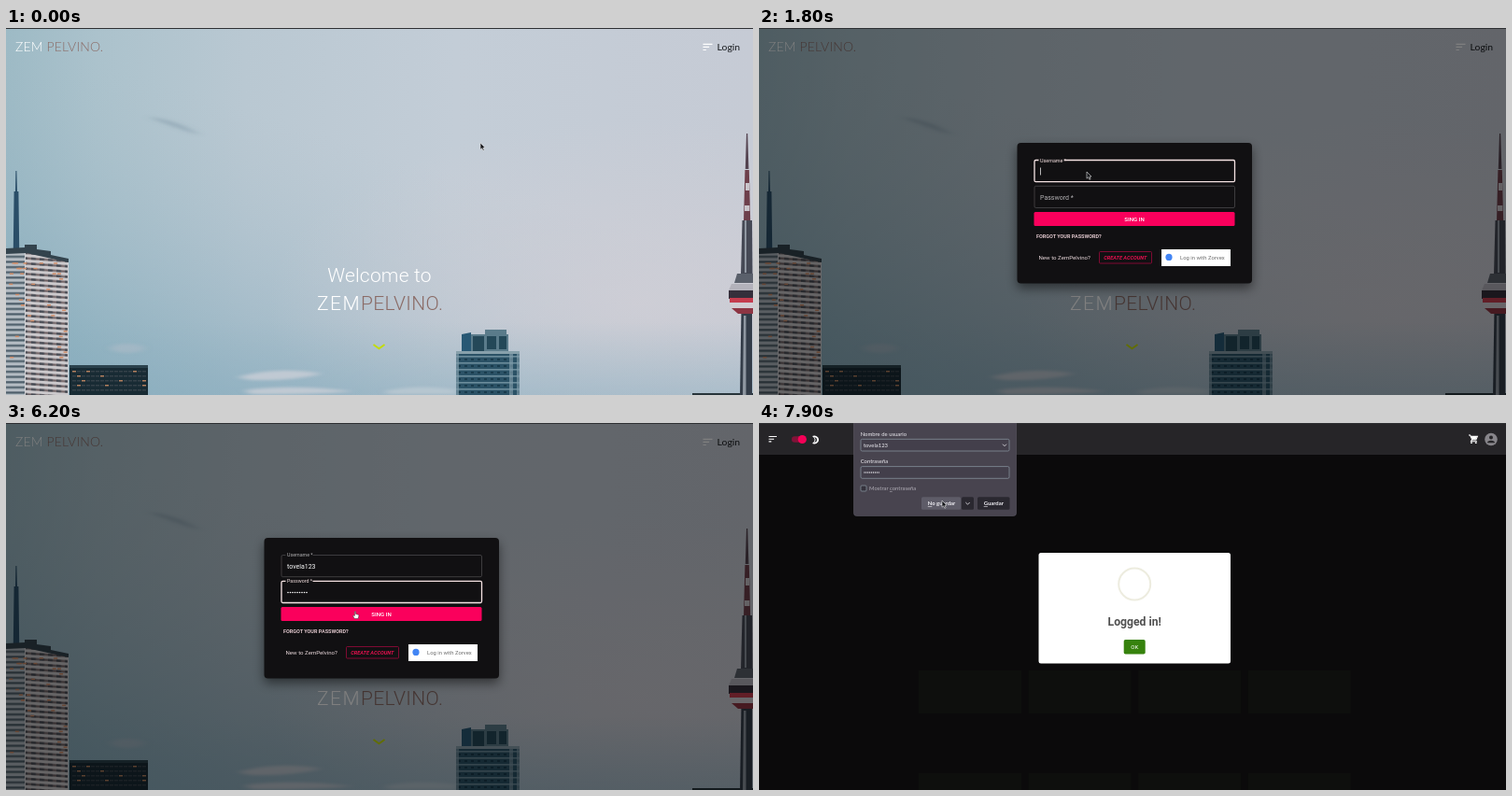
Animation of 800x393 px, one loop 8000 ms. Source, as an HTML page:

```html
<!DOCTYPE html>
<html lang="en">
<head>
<meta charset="utf-8">
<title>Login demo</title>
<style>
html, body { margin: 0; width: 100%; height: 100%; overflow: hidden; background: #0b0a0b; }
svg { display: block; width: 800px; height: 393px; }
text { font-family: Roboto, sans-serif; white-space: pre; }
.brand { font-family: Lato, sans-serif; font-weight: 300; fill: #fff; }
.dim { fill: #8b6c67; }
.ui, .ui text { font-family: Lato, "Open Sans", sans-serif; }
.key { text-decoration: underline; }
</style>
</head>
<body>
<svg viewBox="0 0 800 393" xmlns="http://www.w3.org/2000/svg">
  <defs>
    <linearGradient id="sky">
      <stop offset="0" stop-color="#9dbac5"/><stop offset=".12" stop-color="#abc2cc"/>
      <stop offset=".32" stop-color="#b9c8d2"/><stop offset=".6" stop-color="#c3cdd7"/>
      <stop offset="1" stop-color="#c6cbd5"/>
    </linearGradient>
    <linearGradient id="haze" x1="0" y1="1" x2=".45" y2=".3">
      <stop offset="0" stop-color="#6a9cb0" stop-opacity=".65"/><stop offset=".5" stop-color="#86aabc" stop-opacity=".3"/>
      <stop offset="1" stop-color="#a9bdc8" stop-opacity="0"/>
    </linearGradient>
    <radialGradient id="dusk" cx=".85" cy=".75" r=".5">
      <stop offset="0" stop-color="#d2cfd6" stop-opacity=".75"/><stop offset="1" stop-color="#d2cfd6" stop-opacity="0"/>
    </radialGradient>
    <linearGradient id="low" x2="0" y2="1">
      <stop offset=".8" stop-color="#8fb0c1" stop-opacity="0"/><stop offset="1" stop-color="#8fb0c1" stop-opacity=".45"/>
    </linearGradient>
    <pattern id="floors" width="9" height="5.6" patternUnits="userSpaceOnUse" patternTransform="skewY(4)">
      <rect width="9" height="5.6" fill="#cbc9cc"/><rect y="3.2" width="9" height="2.1" fill="#6d5f61"/><rect y="3.2" width="5" height="2.1" fill="#424851"/>
    </pattern>
    <pattern id="side" width="4" height="5.6" patternUnits="userSpaceOnUse">
      <rect width="4" height="5.6" fill="#b4bcc3"/><rect y="3" width="4" height="2.2" fill="#4c5d69"/>
    </pattern>
    <pattern id="glass" width="7" height="7" patternUnits="userSpaceOnUse">
      <rect width="7" height="7" fill="#2b5266"/><rect y="1" width="7" height="1.6" fill="#6b8c9b"/><rect x="1" y="4" width="3" height="2" fill="#193b4c"/>
    </pattern>
    <filter id="soft" x="-50%" y="-100%" width="200%" height="300%"><feGaussianBlur stdDeviation="4 1.6"/></filter>
    <filter id="shade" x="-20%" y="-20%" width="140%" height="150%" color-interpolation-filters="sRGB"><feDropShadow dx="0" dy="5" stdDeviation="6" flood-opacity=".5"/></filter>
    <g id="sort" stroke-width="1.2"><path d="M0 0H10M0 3.1H6.6M0 6.2H3.3"/></g>
  </defs>

  <g id="home">
    <rect width="800" height="393" fill="url(#sky)"/>
    <rect width="800" height="393" fill="url(#haze)"/>
    <rect width="800" height="393" fill="url(#dusk)"/>
    <rect width="800" height="393" fill="url(#low)"/>
    <g filter="url(#soft)">
      <path d="M152 95Q185 99 208 115Q182 107 152 95" fill="#8ba2b0" opacity=".7"/>
      <path d="M248 374Q290 362 338 370Q310 378 262 377z" fill="#c0c9d3"/>
      <path d="M255 388Q305 381 372 389Q320 393 262 392z" fill="#c0c9d3"/>
      <path d="M405 389Q440 381 482 387V392H410z" fill="#b6c6d0"/>
      <ellipse cx="130" cy="343" rx="18" ry="5" fill="#a9bac6" opacity=".7"/>
    </g>
    <path d="M10.4 153h1l.6 22h1.4l.8 62H7.8l.8-62H10z" fill="#2a4e68"/>
    <path d="M0 240L24 238L67 249V393H0z" fill="url(#floors)"/>
    <path d="M0 240L21 239V393H0z" fill="url(#side)"/>
    <path d="M20.5 239V393M66.5 250V393" stroke="#d0d0d4"/>
    <path d="M0 236L20 235V232H33V237L48 239V243L67 247V251L22 241L0 242z" fill="#33434d"/>
    <path d="M68 361H152V393H68z" fill="#182b34"/>
    <path d="M68 361H152V364H68z" fill="#2b424d"/>
    <g id="lights"></g>
    <path d="M488 328L498 326V348H488z" fill="#285874"/>
    <path d="M498 328H513V323H536V328H538V348H498z" fill="#5a7b8a"/>
    <path d="M500 330H512V346H500zM515 330H525V344H515zM528 330H536V344H528z" fill="#244858"/>
    <path d="M482 347H550V393H482z" fill="url(#glass)"/>
    <path d="M482 347H485V393H482zM539 349H543V393H539zM547 349H550V393H547z" fill="#7f9caa" opacity=".7"/>
    <path d="M482 346H550V349H482z" fill="#87a0ab"/>
    <path d="M735 391H800V393H735z" fill="#27343a"/>
    <path d="M793 113h1.2l1.2 38h-3.6z" fill="#53424f"/>
    <path d="M791.4 152h4.4l1.4 55h-7.2z" fill="#6d3f4b"/>
    <path d="M792 166h4v8h-4zM791 190h5.4v6h-5.4z" fill="#c9c4ca"/>
    <path d="M788.5 206H799L799.5 264H787z" fill="#454955"/>
    <path d="M787.5 300H799V393H786z" fill="#333c48"/>
    <path d="M791 206h2v56h-2zM790 308h2.5v85H789z" fill="#8f97a1"/>
    <path d="M783 263H800V273H780z" fill="#5a606b"/>
    <path d="M777 274H800V281H774z" fill="#b3b2bb"/>
    <path d="M774 281H800V290H774z" fill="#352f3b"/>
    <path d="M775 289H800V294H775z" fill="#c53c4e"/>
    <path d="M775 295H800V300H777z" fill="#d3cdd3"/>
    <path d="M777 300H800V306H784z" fill="#8d3543"/>
    <text class="brand" x="10" y="25" font-size="14" letter-spacing=".15">ZEM <tspan class="dim">PELVINO.</tspan></text>
    <use href="#sort" x="746.5" y="17.3" stroke="#fff"/>
    <text class="ui" x="761.5" y="24" font-size="10.4" fill="#25282c" font-weight="500">Login</text>
    <g class="brand" font-size="21">
      <text x="400" y="272" text-anchor="middle" letter-spacing=".2">Welcome to</text>
      <text x="380" y="302" text-anchor="end" letter-spacing="1.4">ZEM</text>
      <text class="dim" x="380" y="302" letter-spacing=".3">PELVINO.</text>
    </g>
    <path d="M393.5 339L399.5 343.3L405.5 339" fill="none" stroke="#c3dc08" stroke-width="2"/>
  </g>

  <g id="modal">
    <rect width="800" height="393" opacity=".5"/>
    <rect id="card" x="276.5" width="251.5" rx="4" fill="#111012" filter="url(#shade)"/>
    <g id="fields"></g>
    <text id="helper" x="301" y="195.3" font-size="5.3" font-style="italic" fill="#e0392d">At least 8 characters, it must contain 1 letter and 1 number</text>
    <g id="actions">
      <rect id="submit" x="294.5" y="0" width="215" height="15" rx="1.5"/>
      <text id="submitText" x="402" y="9.8" font-size="6.1" font-weight="500" text-anchor="middle">SING IN</text>
      <text x="297" y="27.6" font-size="5.5" font-weight="700" fill="#e2c8ce">FORGOT YOUR PASSWORD?</text>
      <text x="299.5" y="51" font-size="6.1" fill="#ead9dc">New to ZemPelvino?</text>
      <rect x="364.5" y="42.5" width="56" height="12.5" rx="1" fill="none" stroke="#9c0a3b" stroke-width=".8"/>
      <text x="392.3" y="51" font-size="5.6" font-weight="700" font-style="italic" text-anchor="middle" fill="#e5104f">CREATE ACCOUNT</text>
      <rect x="431" y="40" width="74" height="18" fill="#fff"/>
      <circle cx="439" cy="48.4" r="3.6" fill="#4285f4"/>
      <text x="451" y="51" font-size="5.9" fill="#6b6b6b">Log in with Zorvex</text>
    </g>
  </g>

  <g id="shop">
    <rect width="800" height="393" fill="#0b0a0b"/>
    <rect width="800" height="34" fill="#262528"/>
    <g id="cards" fill="#0e0f0d"></g>
    <use href="#sort" transform="translate(10.5 14.6) scale(.85)" stroke="#fff"/>
    <rect x="35" y="14.3" width="14" height="6.5" rx="3.2" fill="#811338"/>
    <circle cx="46.3" cy="17.5" r="4.6" fill="#f50057"/>
    <path d="M57 14A5 4.4 0 1 1 57 22Q62.3 18 57 14z" fill="#fff"/>
    <path d="M59 15.2Q62.2 18 59 20.8Q62 20.8 62 18T59 15.2" fill="#262528"/>
    <path d="M760 13h1.6l2.2 5h4l1.6-3.7h-7M763.5 18l-1 1.8h6.5" fill="none" stroke="#fff" stroke-width="1.1"/>
    <path d="M762.4 14H769L767.4 17.8H764z" fill="#fff"/>
    <circle cx="763" cy="21.2" r=".9" fill="#fff"/><circle cx="767.8" cy="21.2" r=".9" fill="#fff"/>
    <circle cx="784" cy="17.5" r="6.8" fill="#87858a"/>
    <circle cx="784" cy="15.6" r="2" fill="#262528"/><path d="M780 21.3Q780 18.8 784 18.8T788 21.3z" fill="#262528"/>
    <g id="alert">
      <rect x="299.5" y="139" width="205.5" height="118.5" rx="2.5" fill="#fff"/>
      <circle cx="402.2" cy="172.5" r="17" fill="none" stroke="#edecdf" stroke-width="2"/>
      <text x="402.2" y="216.7" font-size="12.2" font-weight="700" text-anchor="middle" fill="#505050">Logged in!</text>
      <rect x="390.7" y="232" width="23" height="15.5" rx="1.8" fill="#36820d"/>
      <text x="402.2" y="242" font-size="6.2" text-anchor="middle" fill="#fff">OK</text>
    </g>
  </g>

  <path d="M0 .5H800" stroke="#2e3033"/>

  <g id="popup" class="ui" font-size="5.9" fill="#eeedf2">
    <path d="M101.5 0H275.5V96.5Q275.5 99.5 272.5 99.5H104.5Q101.5 99.5 101.5 96.5z" fill="#48444f" stroke="#5b5863" stroke-width=".6"/>
    <text x="108.7" y="13.6">Nombre de usuario</text>
    <text x="108.7" y="43">Contraseña</text>
    <g fill="#433f4b" stroke="#85909b" stroke-width=".8">
      <rect x="109" y="17.3" width="159" height="12.7" rx="1.5"/><rect x="109" y="46.6" width="159" height="12.7" rx="1.5"/>
      <rect x="109" y="67" width="6" height="6" rx="1" fill="#34313b"/>
    </g>
    <text x="112" y="25.7">tovela123</text>
    <g id="savedDots"></g>
    <text x="118" y="72.2" fill="#b0adb6">Mostrar <tspan class="key">c</tspan>ontraseña</text>
    <rect id="skip" x="174" y="79.3" width="42" height="13.5" rx="1.5"/>
    <rect x="217" y="79.3" width="13" height="13.5" rx="1.5" fill="#2a2830"/>
    <rect x="234" y="79.3" width="34.5" height="13.5" rx="1.5" fill="#2a2830"/>
    <path d="M261 22.7l2 2 2-2M221.3 85l2.2 2.2 2.2-2.2" fill="none" stroke="#eeedf2" stroke-width=".8"/>
    <g font-weight="700" text-anchor="middle">
      <text x="195.5" y="88"><tspan class="key">N</tspan>o guardar</text>
      <text x="251.3" y="88"><tspan class="key">G</tspan>uardar</text>
    </g>
  </g>

  <g id="pointer">
    <path id="arrow" d="M0 0V7.2L1.7 5.8L2.9 8.3L4.1 7.7L2.9 5.3L5 5.1z" fill="#15161a" stroke="#e8e8ea" stroke-width=".6"/>
    <path id="hand" d="M-.6 0Q0-.8.6 0V2.6L3.4 3.3Q4 3.6 3.9 4.5L3.2 7.4H-.7L-2.6 4.6Q-2.4 3.6-.6 4.4z" fill="#fff" stroke="#222" stroke-width=".5"/>
    <path id="beam" d="M-1.6 0H1.6M0 0V6.4M-1.6 6.4H1.6" fill="none" stroke="#eee" stroke-width=".9"/>
  </g>
</svg>

<script>
const LOOP = 8000, USER = "tovela123";
const el = id => document.getElementById(id);
const clamp = v => Math.min(1, Math.max(0, v));
const ramp = (t, from, span) => clamp((t - from) / span);
const easeOut = p => 1 - (1 - p) ** 3;
const show = (node, on) => node.setAttribute("visibility", on ? "visible" : "hidden");
const lerp = (a, b, p) => a + (b - a) * p;

function make(parent, tag, attrs, text) {
  const node = document.createElementNS("http://www.w3.org/2000/svg", tag);
  set(node, attrs);
  if (text) node.textContent = text;
  return parent.appendChild(node);
}
function set(node, attrs) {
  for (const key in attrs) node.setAttribute(key, attrs[key]);
}

// Seeded lit windows and faint shop cards
let seed = 7;
const rnd = () => (seed = seed * 16807 % 2147483647) / 2147483647;
for (let y = 367; y < 392; y += 5)
  for (let x = 71; x < 149; x += 5)
    make(el("lights"), "rect", { x, y, width: 4, height: 1.5, fill: rnd() < .25 ? "#b3805f" : "#344149" });
for (let i = 0; i < 34; i++)
  make(el("lights"), "rect", { x: 2 + rnd() * 60, y: 251.2 + Math.floor(rnd() * rnd() * 24) * 5.6, width: 4, height: 1.5, fill: "#d08d68" });
for (let i = 0; i < 9; i++)
  make(el("lights"), "rect", { x: 488 + rnd() * 50, y: 354 + Math.floor(rnd() * 5) * 7, width: 3, height: 1.6, fill: "#c9a27c" });
for (let i = 0; i < 8; i++)
  make(el("cards"), "rect", { x: 171 + i % 4 * 117.6, y: i < 4 ? 265 : 375, width: 110, height: 46 });
for (let i = 0; i < 9; i++)
  make(el("savedDots"), "circle", { cx: 113 + i * 1.9, cy: 53, r: .65 });

function field(name, secret) {
  const g = make(el("fields"), "g", {});
  const box = make(g, "rect", { x: 295, width: 214.5, height: 23.2, rx: 1.5, fill: "none" });
  const notch = make(g, "rect", { x: 299.5, height: 2.4, fill: "#111012" });
  const label = make(g, "text", { x: 301 }, name + " *");
  const value = make(g, "text", { x: 301, "font-size": 7, fill: "#fff" });
  const dots = Array.from({ length: secret ? 9 : 0 }, (_, i) => make(g, "circle", { cx: 302 + i * 2.5, r: .8, fill: "#fff" }));
  const caret = make(g, "rect", { width: .7, height: 8, fill: "#fff" });
  return ({ y, focus, error, float, count, blink }) => {
    const line = error ? "#d8382c" : focus ? "#f6e4e4" : "#4a484b";
    set(box, { y, stroke: error && !focus ? "#a32f28" : line, "stroke-width": focus ? 1.3 : .8 });
    set(notch, { y: y - 1.2, width: 29 * float });
    set(label, { y: lerp(y + 14.2, y + 1.9, float), "font-size": lerp(7, 5.3, float),
      fill: error ? "#dd3b2f" : focus ? "#f0dcdc" : "#b3b1b4" });
    value.textContent = secret ? "" : USER.slice(0, count);
    set(value, { y: y + 14.4 });
    dots.forEach((dot, i) => { set(dot, { cy: y + 12.2 }); show(dot, i < count); });
    const end = secret ? 301 + count * 2.5 : 301 + (count ? value.getComputedTextLength() : 0);
    set(caret, { x: end + .2, y: y + 8 });
    show(caret, focus && blink);
  };
}
const userField = field("Username"), passField = field("Password", true);

const userKeys = [2500, 2600, 2700, 2800, 2900, 3000, 3100, 3200, 3300];
const passKeys = [4200, 4400, 4600, 4800, 5100, 5300, 5500, 5800, 6000];
const typed = (keys, t) => keys.filter(k => k <= t).length;

const path = [
  [0, 508, 123], [200, 540, 112], [500, 680, 58], [800, 764, 21], [1200, 764, 21], [1400, 650, 62], [1500, 650, 62],
  [1600, 480, 118], [1700, 375, 151], [1800, 351, 154], [2100, 351, 152], [5800, 351, 152], [6200, 374, 202],
  [6600, 374, 202], [7000, 300, 152], [7400, 209, 99], [7600, 209, 99], [7900, 196, 83], [8000, 196, 83]
];
const shapes = [[0, "arrow"], [800, "hand"], [1300, "arrow"], [1900, "beam"], [5900, "arrow"], [6100, "hand"], [6800, "arrow"]];

function drawPointer(t) {
  const i = path.findIndex(p => p[0] > t), [t0, x0, y0] = path[i - 1], [t1, x1, y1] = path[i];
  const p = (t - t0) / (t1 - t0);
  set(el("pointer"), { transform: `translate(${lerp(x0, x1, p)} ${lerp(y0, y1, p)})` });
  const shape = shapes.filter(s => s[0] <= t).pop()[1];
  for (const id of ["arrow", "hand", "beam"]) show(el(id), id === shape);
}

function drawForm(t) {
  const invalid = t >= 2500 && t < 5800, top = invalid ? 118 : 123;
  const userFocus = t >= 1700 && t < 3700, passFocus = t >= 3700 && t < 6600;
  set(el("modal"), { opacity: easeOut(ramp(t, 900, 300)) });
  set(el("card"), { y: top, height: invalid ? 160.5 : 150.5 });
  userField({ y: top + 18.5, focus: userFocus, float: easeOut(ramp(t, 1650, 250)),
    count: typed(userKeys, t), blink: t < 3500 });
  passField({ y: top + 46.3, focus: passFocus, error: invalid, float: easeOut(ramp(t, 3650, 250)),
    count: typed(passKeys, t), blink: t < 5800 });
  show(el("helper"), invalid);
  set(el("actions"), { transform: `translate(0 ${invalid ? 202 : 197})` });
  const p = ramp(t, 6200, 400);
  set(el("submit"), { fill: invalid ? "#2b292c" : `rgb(${lerp(250, 174, p)},0,${lerp(92, 66, p)})` });
  set(el("submitText"), { fill: invalid ? "#737174" : "#fff" });
}

function render(t) {
  const inside = t >= 7800;
  set(el("home"), { display: inside ? "none" : "inline" });
  set(el("modal"), { display: inside || t < 1000 ? "none" : "inline" });
  set(el("shop"), { display: inside ? "inline" : "none" });
  if (!inside) drawForm(t);
  const k = t < 7900 ? 1.04 : 1;
  set(el("alert"), { transform: `translate(402.2 198.2) scale(${k}) translate(-402.2 -198.2)` });
  set(el("popup"), { opacity: ramp(t, 6900, 200), display: t > 6900 ? "inline" : "none" });
  set(el("skip"), { fill: inside ? "#5e5c68" : "#232633" });
  drawPointer(t);
}

// The picture advances in steps of 100 ms
const start = performance.now();
function tick() {
  const t = (performance.now() - start) % LOOP;
  render(Math.floor(t / 100) * 100);
  requestAnimationFrame(tick);
}
tick();
</script>
</body>
</html>
```
